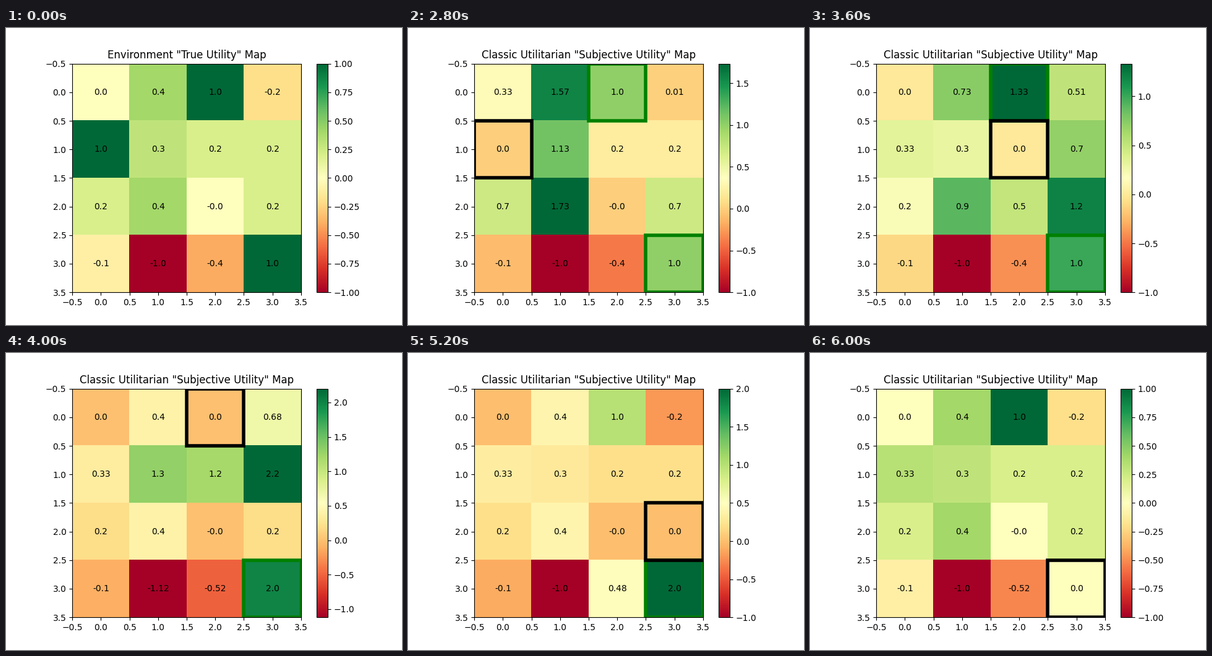
These frames come from a looping animation (640 by 480 pixels, 6.4 s). A matplotlib script:

```python
import matplotlib.pyplot as plt
from matplotlib.animation import FuncAnimation
from matplotlib.patches import Rectangle
import numpy as np

TRUE_MAP = np.array([
    [0.0, 0.4, 1.0, -0.2],
    [1.0, 0.3, 0.2, 0.2],
    [0.2, 0.4, -0.0, 0.2],
    [-0.1, -1.0, -0.4, 1.0],
])
GOALS = [(0, 2), (1, 0), (3, 3)]
PATH = [(0, 0), (1, 0), (2, 1), (1, 2), (0, 2),
        (1, 3), (1, 2), (2, 3), (2, 2), (3, 3)]
RISK = 0.12
INTRO = 5
STEP_MS = 400

TRUE_TITLE = 'Environment "True Utility" Map'
AGENT_TITLE = 'Classic Utilitarian "Subjective Utility" Map'


def subjective(base, agent, weights):
    """Utility seen by the agent: neighbours towards a goal gain its weight."""
    seen = base.copy()
    row, col = agent
    for dr in (-1, 0, 1):
        for dc in (-1, 0, 1):
            r, c = row + dr, col + dc
            if (dr, dc) == (0, 0) or r > 3 or c > 3:
                continue
            # index -1 wraps round to the far side
            if base[r, c] < 0:
                seen[r, c] -= RISK
            for (gr, gc), w in weights.items():
                if dr and dr == np.sign(gr - row):
                    seen[r, c] += w
                if dc and dc == np.sign(gc - col):
                    seen[r, c] += w
    seen[agent] = 0.0
    return seen


def collect(weights, goal):
    """Drop a reached goal and raise the weight of those listed after it."""
    left = {g: w for g, w in weights.items() if g != goal}
    for g in left:
        if GOALS.index(g) > GOALS.index(goal):
            left[g] = 1 / len(left)
    return left


def walk():
    base = TRUE_MAP.copy()
    weights = {g: 1 / len(GOALS) for g in GOALS}
    states = [(base.copy(), PATH[0], list(weights))]
    for agent in PATH:
        if agent in weights:
            if len(weights) == len(GOALS):
                base[agent] = weights[agent]
            weights = collect(weights, agent)
        states.append((subjective(base, agent, weights), agent, list(weights)))
    return states


def outline(ax, cell, color):
    row, col = cell
    ax.add_patch(Rectangle((col - 0.5, row - 0.5), 1, 1, fill=False,
                           edgecolor=color, linewidth=4))


def draw(i):
    if i < INTRO:
        values, agent, goals, title = TRUE_MAP, None, [], TRUE_TITLE
    else:
        values, agent, goals = STATES[i - INTRO]
        title = AGENT_TITLE

    fig.clear()
    ax = fig.add_subplot()
    image = ax.imshow(values, cmap="RdYlGn")
    fig.colorbar(image)
    for (row, col), v in np.ndenumerate(values):
        ax.text(col, row, str(round(float(v), 2)), ha="center", va="center")
    for goal in goals:
        outline(ax, goal, "green")
    if agent is not None:
        outline(ax, agent, "black")
    ax.set_title(title)
    return []


STATES = walk()
fig = plt.figure(figsize=(6.4, 4.8), dpi=100)
anim = FuncAnimation(fig, draw, frames=INTRO + len(STATES), init_func=lambda: draw(0),
                     interval=STEP_MS, repeat=True, repeat_delay=0)
plt.show()
```
